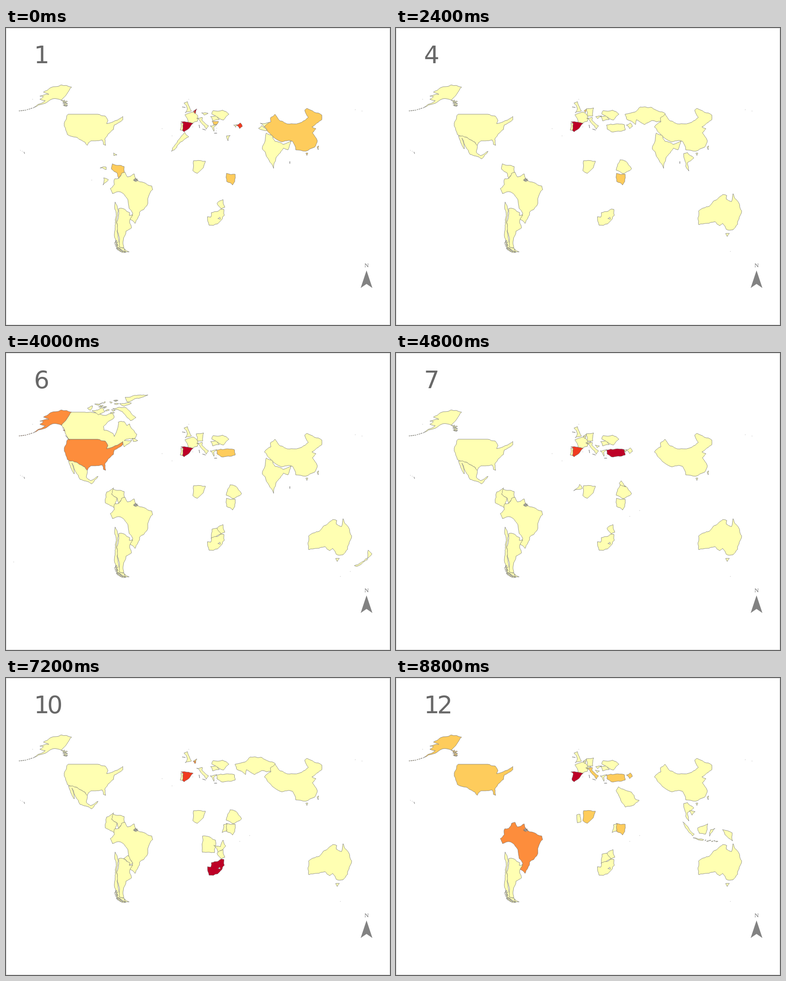
Animation, 851 px wide and 658 px high, one loop 9600 ms. Source, as an HTML page:

```html
<!DOCTYPE html>
<html lang="en">
<head>
<meta charset="utf-8">
<title>Map by month</title>
<style>
html, body { margin: 0; width: 100%; height: 100%; overflow: hidden; background: #fff; }
svg { display: block; }
#month { font: 54px "DejaVu Sans", sans-serif; letter-spacing: -5px; fill: #686868; }
#map { stroke: #6e6e6e; stroke-width: .75; stroke-linejoin: round; stroke-linecap: square; fill-rule: evenodd; }
</style>
</head>
<body>
<svg width="851" height="658" viewBox="0 0 851 658">
  <rect x=".5" y=".5" width="850" height="657" fill="#fff" stroke="#d2d2d2"/>
  <g id="map"></g>
  <text id="month" x="62" y="78"></text>
  <text x="799" y="530" text-anchor="middle" font-family="Liberation Serif, serif" font-size="13.5" fill="#6e6e6e">N</text>
  <path d="M799 537L812 576L799 567L786 576Z" fill="#828282"/>
</svg>
<script>
const map = document.getElementById('map');
const label = document.getElementById('month');
const shapes = {};

const hash = (x, y) => {
  const v = Math.sin(x * 12.9898 + y * 78.233) * 43758.5453;
  return v - Math.floor(v);
};

// Splits an edge into a ragged line; both neighbours of a border get the same one.
function ragged(a, b) {
  if (a[0] > b[0] || (a[0] === b[0] && a[1] > b[1])) {
    return [...ragged(b, a).slice(1).reverse(), a].reverse().length ? [a, ...ragged(b, a).slice(1).reverse()] : [];
  }
  const dx = b[0] - a[0], dy = b[1] - a[1];
  const length = Math.hypot(dx, dy);
  if (length < 6 || dy === 0) return [a];
  const x = (a[0] + b[0]) / 2, y = (a[1] + b[1]) / 2;
  const shift = (hash(x, y) - .5) * Math.min(.22, 4 / length);
  const mid = [x - dy * shift, y + dx * shift];
  return [...ragged(a, mid), ...ragged(mid, b)];
}

function ringPath(ring) {
  const points = ring.split(' ').map(pair => pair.split(',').map(Number));
  if (points.length < 3) return `M${points.join(' ')}Z`;
  const line = points.flatMap((p, i) => ragged(p, points[(i + 1) % points.length]));
  return 'M' + line.map(p => p.map(v => v.toFixed(1)).join()).join(' ') + 'Z';
}

// Rings are separated by "/"; a ring of one point is a tiny island.
function land(code, rings, extra = '') {
  const path = document.createElementNS('http://www.w3.org/2000/svg', 'path');
  path.setAttribute('d', rings.split('/').map(ringPath).join('') + extra);
  shapes[code] = map.appendChild(path);
}

// Small islets: place(i) gives the centre of islet i.
function islets(count, size, place) {
  let d = '';
  for (let i = 0; i < count; i++) {
    const [x, y] = place(i);
    const w = size * (.4 + hash(i, 1)), h = size * (hash(i, 2) - .5);
    d += `M${x - w},${y}l${w},${h - size / 3}l${w},${size / 4}l${-w},${size / 2}Z`;
  }
  return d;
}

// Americas
land('us', '138,191 203,191 220,195 226,205 223,212 237,208 247,204 259,196 259,203 240,215 238,225 219,246 221,260 216,258 213,248 198,250 188,250 180,260 168,249 156,242 136,236 129,217 135,194/32,271/36,273/40,275 41,278');
land('ak', '145,131 122,126 96,134 83,142 95,147 75,151 83,152 75,158 87,161 62,176 103,157 123,160/123,160 136,167 134,174/59,158/774,181/789,184',
  islets(8, 1.3, i => [61 - 4.4 * i, 177 + 6.5 * Math.sin(i / 5)]) + islets(6, 3, i => [129 + i % 2 * 4, 162 + i * 2]));
land('ca', '145,131 175,131 222,138 235,133 240,142 216,163 217,171 237,178 240,185 247,168 249,153 262,152 268,161 274,157 290,180 286,189 262,194 279,193 262,208 259,196 247,204 237,208 223,212 226,205 220,195 203,191 138,191 131,177 123,160/280,189 292,194 282,196/132,183 141,193');
land('ci', '181,122 192,117 187,127/191,128 215,121 219,130 205,137/237,123 266,121 288,143 276,150 258,130/314,93 264,98 268,108/197,113 215,110 206,116/252,112 278,111 262,118',
  islets(12, 4, i => [207 + hash(i, 3) * 42, 105 + hash(i, 4) * 28]));
land('mx', '139,239 156,242 168,249 180,260 178,275 187,283 204,273 190,290 164,280 146,244 151,268');
land('ve', '236,301 262,307 262,320 250,333 246,321 234,313');
land('co', '238,299 223,308 220,332 242,343 246,321 234,313');
land('ec', '217,332 227,336 215,348/190,337');
land('pa', '209,310 222,308 222,314 214,310');
land('do', '239,277 246,281 239,283');
land('br', '264,320 269,330 284,323 288,336 323,350 325,358 316,373 312,394 296,408 286,433 275,424 281,411 273,400 270,380 253,363 236,367 231,356 240,347 241,334 250,333 256,322',
  islets(4, 4, i => [286 + i, 336 + i]));
land('py', '261,400 270,393 281,410 273,414');
land('ar', '250,400 262,401 274,409 273,415 281,414 274,430 278,443 266,450 260,470 261,487 251,485 245,430/263,490 273,496 264,496');
land('cl', '242,386 247,400 246,450 251,485 262,488 265,497 246,486 241,450 242,425',
  islets(11, 3.5, i => [244 + i * i / 5, 473 + 24 * Math.sin(i / 7)]));

// Europe
land('es', '388,208 415,211 406,222 395,230 390,226 393,212/414,219');
land('pt', '388,211 393,212 391,227 386,226/346,223/368,239');
land('uk', '395,166 402,163 405,172 411,184 397,188 402,179/391,175 397,176/405,158');
land('fr', '397,192 414,186 425,194 424,207 413,211 404,209/428,210');
land('nl', '417,183 423,179 420,187');
land('be', '415,184 421,186 419,190');
land('de', '422,179 438,177 436,195 424,195');
land('ch', '421,199 432,196 426,202');
land('at', '428,195 444,191 442,198');
land('cz', '434,188 448,189 439,193');
land('pl', '439,178 458,177 458,190 440,187');
land('hu', '443,196 456,195 447,201');
land('hr', '442,204 451,206 446,210');
land('ro', '454,196 467,194 473,203 458,206');
land('bg', '457,207 471,207 468,213 460,214');
land('ua', '456,190 459,183 480,182 494,191 482,204 463,194');
land('gr', '453,217 467,214 460,220 461,229/462,233 467,233/467,222/466,228');
land('it', '423,200 435,198 434,204 449,217 444,224 440,217 429,204/436,224 442,226/428,215 429,221');
land('tr', '467,215 485,213 506,214 508,226 477,230 468,224');
land('am', '505,215 511,214 509,220');
land('az', '511,215 519,210 524,218 518,223');
land('fi', '447,133 462,130 469,152 453,159 456,146');

// Asia
land('kz', '508,191 530,186 541,175 567,176 597,190 588,207 567,205 551,214 533,203 531,214 512,203');
land('kg', '564,211 584,209 572,219');
land('tj', '560,222 567,216 579,227');
land('mn', '597,192 620,189 650,193 670,199 655,209 632,211 608,206');
land('cn', '573,219 587,208 586,199 596,191 608,206 632,212 655,209 670,198 662,182 667,178 700,193 700,203 678,219 687,223 679,232 690,250 684,264 664,273 642,270 635,251 610,252 590,240/665,277 669,277 667,282/690,263 693,261 692,270');
land('in', '577,233 591,239 596,251 614,258 632,250 625,270 615,266 599,286 593,311 574,274 568,268/629,296 629,300');
land('bd', '616,260 625,263 623,270');
land('pk', '577,228 551,250 555,262 570,266 580,238');
land('jp', '720,204 729,208 720,212/722,215 727,224 706,241 706,236 719,230');
land('kr', '694,224 701,223 702,232 696,234');
land('th', '638,278 646,276 660,288 646,298 649,317 642,306');
land('vn', '646,270 660,273 668,298 660,306 661,289');
land('kh', '651,294 663,296 656,304');
land('my', '646,316 657,330 648,325/672,331 692,317 693,322 682,332');
land('ph', '693,281 698,286 697,294/708,308 711,317 701,314', islets(5, 3, i => [699 + i % 3 * 3, 298 + i * 2]));
land('id', '636,319 661,346 657,350 641,331/659,354 682,358 680,360/669,332 691,323 686,346 672,344/695,350 697,336 707,333 701,341/724,336 745,343 746,361 729,347',
  islets(6, 2, i => [686 + i * 5, 360 + i % 2 * 2]));
land('jo', '489,239 497,238 492,250');
land('sa', '488,249 493,241 522,253 530,268 539,271 528,281 508,286 497,267');
land('om', '541,261 548,269 533,286 531,280');
land('ae', '529,265 539,261 537,268');

// Africa
land('ma', '367,273 383,247 396,231 405,241 386,253 378,265');
land('dz', '403,229 427,227 436,264 419,279 388,256 405,241');
land('ng', '416,294 442,295 437,310 424,322 414,316');
land('gh', '401,303 408,302 410,319 402,321');
land('bf', '394,305 407,291 413,300');
land('sn', '367,292 374,287 381,299 367,299');
land('et', '497,292 509,295 522,312 505,323 488,315');
land('er', '495,288 499,283 509,297 497,292');
land('ke', '489,322 508,324 507,340 502,348 489,340');
land('ug', '479,342 482,325 490,323 489,339');
land('cm', '442,296 447,329 431,327 437,310');
land('ao', '436,350 451,352 464,359 462,387 435,386');
land('zm', '461,371 475,374 481,359 487,372 470,387');
land('na', '435,386 470,387 457,392 454,418 447,419');
land('bw', '457,390 468,388 477,400 460,411 455,412');
land('zw', '468,388 481,380 485,397 477,401');
land('mz', '489,369 505,366 504,378 489,393 483,409 486,384');
land('mw', '486,364 490,363 489,380');
land('za', '447,418 454,419 455,409 470,406 477,401 483,402 484,415 469,434 450,437/470,422 474,419 475,423');
land('sc', '518,362/540,349');
land('mu', '544,394');

// Oceania
land('au', '671,405 694,395 703,384 724,369 733,371 732,379 743,385 747,367 754,380 766,405 757,435 747,447 732,446 724,433 717,438 707,429 671,436/731,455 739,455 734,462/741,495');
land('nz', '803,437 811,445 801,456 802,447/799,455 801,458 776,473 772,471/763,484/17,463');

const shades = ['#ffffb2', '#fecc5c', '#fd8d3c', '#f03b20', '#bd0026'];

// Per month: land codes for each shade, palest first.
const months = [
  ['us ak do pa ec br cl ar uk fr it cz ro ua gr pt am jo ma ng zw za kg tj in', 'cn ve ke bg', '', 'be az', 'es nl'],
  ['ca ci co br ar uk nl be fr de pl ch at it hu ro bg pt tr sn gh ng et ug na zw mz za tj in cn au nz', 'ke', '', 'es am az', 'us ak'],
  ['mx co br uk nl be fr de it ro ua pt tr ng et ke zw za in cn au', 'gr az', '', '', 'es'],
  ['us ak mx ve br cl ar uk fr de it hu ro ua pt tr az ng et za kz cn in th au', 'nl ke', '', '', 'es'],
  ['ca ci mx ve br cl ar de hu ro ua gr pt tr fi dz ae kz mn cn pk th vn kh my ph jp gh ng et na zw mz mw au nz mu', 'uk fr it in bd ke za az', 'us ak nl', '', 'es'],
  ['ca ci mx co ve br cl ar uk fr de it ro ua gr pt ng et ke bw zw za cn in au nz', 'tr', 'us ak', '', 'es'],
  ['us ak mx co ve br cl ar uk nl be fr de ch it hr ro ua gr pt am az bf ng er et ke zw za cn au sc', '', '', 'es', 'tr'],
  ['mx co br cl ar uk fr de it ro ua gr pt ng et ke na zw za cn in au sc', 'us ak', '', 'tr', 'es'],
  ['ca ci mx co ve br uk be fr de pl ch at it hu ro bg ua gr pt es jo om ma gh ng cm ug ke ao na zw za kg in cn kr au nz sc', 'nl', 'tr', '', 'us ak'],
  ['us ak mx co ve br py cl ar uk it ro ua gr pt tr kz cn ng et ug ke ao zm zw au sc', 'nl', 'be', 'es', 'za'],
  ['ca ci mx co br uk fr de it ro ua gr pt tr ng gh ke zw za in cn au nz sc', 'us ak', '', '', 'es'],
  ['cl ar uk nl be fr de ch hr hu ro ua gr sa gh ug bw zw za cn th kh id au sc', 'us ak it tr az ng ke', 'br', '', 'es']
];

function show(month) {
  label.textContent = month + 1;
  for (const code in shapes) shapes[code].style.display = 'none';
  months[month].forEach((codes, level) => {
    for (const code of codes.split(' ').filter(Boolean)) {
      shapes[code].style.display = '';
      shapes[code].style.fill = shades[level];
    }
  });
}

let current = -1;
function tick() {
  const month = Math.floor(performance.now() / 800) % 12;
  if (month !== current) show(current = month);
  requestAnimationFrame(tick);
}
tick();
</script>
</body>
</html>
```
